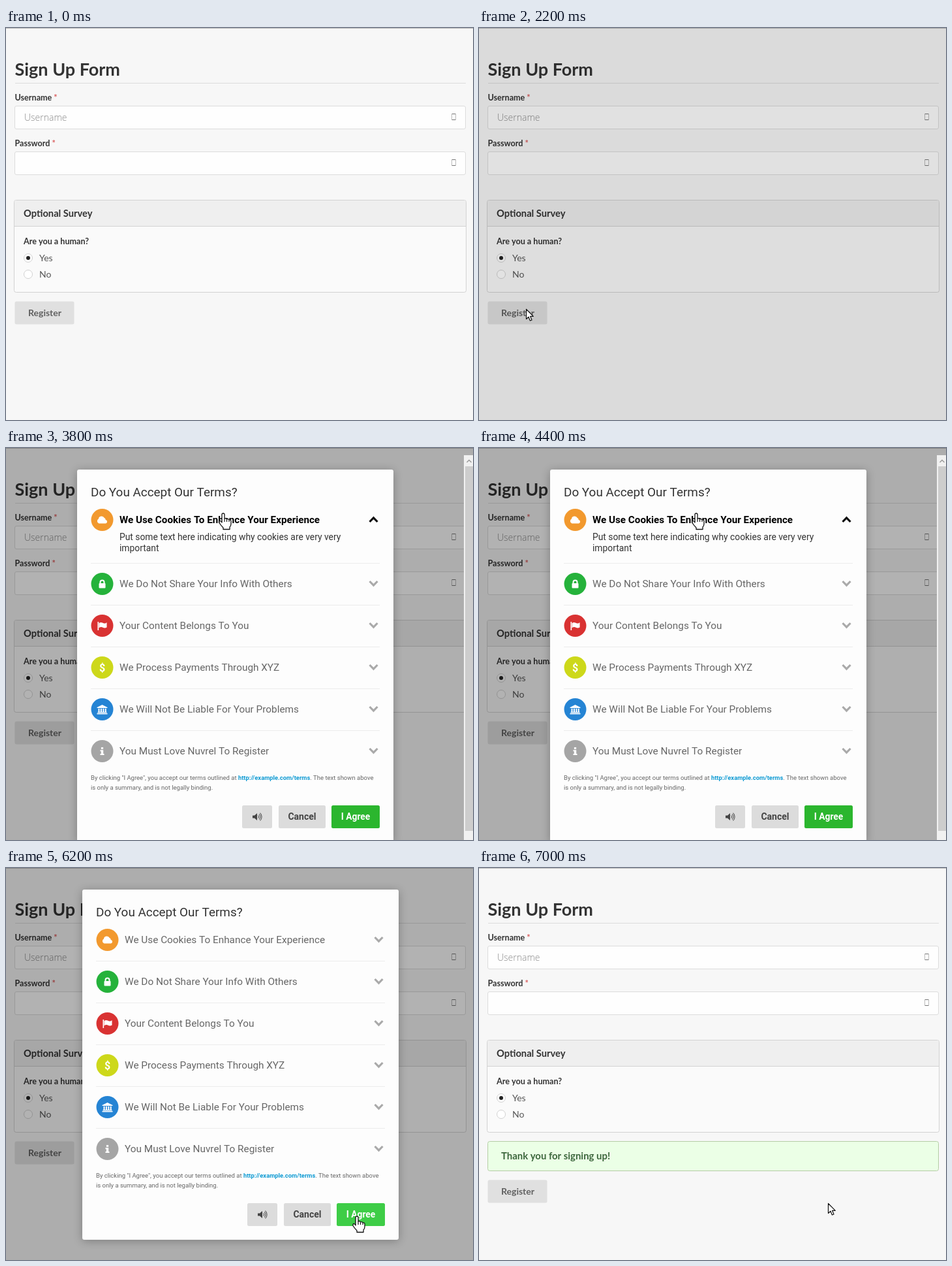
These frames come from a looping animation (716x600 px, 7.4 s). An HTML page with a canvas:

```html
<!DOCTYPE html>
<html lang="en">
<head>
<meta charset="utf-8">
<title>Sign Up Form</title>
<style>
html, body { margin: 0; width: 100%; height: 100%; overflow: hidden; background: #f7f7f7; }
canvas { display: block; }
</style>
</head>
<body>
<canvas id="stage" width="716" height="600"></canvas>
<script>
const ctx = document.getElementById('stage').getContext('2d');
const LOOP = 7400, STEP = 200;
const LATO = 'Lato, sans-serif', ROBOTO = 'Roboto, sans-serif';

const ROWS = [
  ['We Use Cookies To Enhance Your Experience', '#f2992e', cloud],
  ['We Do Not Share Your Info With Others', '#25b23b', lock],
  ['Your Content Belongs To You', '#d93232', flag],
  ['We Process Payments Through XYZ', '#cdd81a', dollar],
  ['We Will Not Be Liable For Your Problems', '#2584d4', bank],
  ['You Must Love Nuvrel To Register', '#a5a5a5', info]
];

// Pointer path: time, x, y
const PATH = [
  [200, 677, 52], [400, 560, 230], [600, 380, 400], [800, 200, 487], [1000, 96, 452],
  [1200, 72, 430], [2300, 72, 430], [2600, 215, 350], [2800, 250, 290], [3000, 268, 233],
  [3200, 305, 158], [3400, 333, 100], [4600, 333, 100], [4800, 410, 112], [5000, 473, 180],
  [5200, 505, 270], [5400, 525, 390], [5600, 536, 495], [5800, 538, 533], [6400, 538, 533],
  [6800, 535, 513], [7400, 535, 513]
];

const ramp = (t, a, b) => Math.min(1, Math.max(0, (t - a) / (b - a)));
const smooth = p => p * p * (3 - 2 * p);

function pointer(t) {
  let i = 1;
  while (i < PATH.length - 1 && PATH[i][0] < t) i++;
  const [t0, x0, y0] = PATH[i - 1], [t1, x1, y1] = PATH[i];
  const p = ramp(t, t0, t1);
  return { x: x0 + (x1 - x0) * p, y: y0 + (y1 - y0) * p };
}

function text(str, x, y, font, color, align = 'left') {
  ctx.font = font;
  ctx.fillStyle = color;
  ctx.textAlign = align;
  ctx.fillText(str, x, y);
  return ctx.measureText(str).width;
}

function box(x, y, w, h, r, fill, stroke) {
  ctx.beginPath();
  ctx.roundRect(x, y, w, h, r);
  if (fill) { ctx.fillStyle = fill; ctx.fill(); }
  if (stroke) { ctx.strokeStyle = stroke; ctx.lineWidth = 1; ctx.stroke(); }
}

function rect(x, y, w, h, fill) {
  ctx.fillStyle = fill;
  ctx.fillRect(x, y, w, h);
}

function disc(x, y, r, fill, stroke) {
  ctx.beginPath();
  ctx.arc(x, y, r, 0, 2 * Math.PI);
  ctx.fillStyle = fill;
  ctx.fill();
  if (stroke) { ctx.strokeStyle = stroke; ctx.lineWidth = 1; ctx.stroke(); }
}

function shape(d, fill, stroke, width = 1) {
  const p = new Path2D(d);
  if (fill) { ctx.fillStyle = fill; ctx.fill(p); }
  if (stroke) { ctx.strokeStyle = stroke; ctx.lineWidth = width; ctx.stroke(p); }
}

// Row icons, centred on 0,0
function cloud() { shape('M-5 5.5A3.8 3.8 0 0 1-5.6-1.5A4.6 4.6 0 0 1 3-3.2A3.3 3.3 0 0 1 5.2 0A2.8 2.8 0 0 1 5.4 5.5Z', '#fff'); }
function lock() {
  box(-5, -1, 10, 7.5, 1, '#fff');
  shape('M-3 0V-2.5A3 3 0 0 1 3-2.5V0', null, '#fff', 2);
}
function flag() {
  rect(-7, -6, 1.6, 13, '#fff');
  shape('M-5-4Q-2-6 1-4.2T7-5V2.6Q4 4.5 1 2.8T-5 3.5Z', '#fff');
}
function dollar() { text('$', 0, 6, 'bold 16px ' + ROBOTO, '#fff', 'center'); }
function bank() {
  shape('M0-7L8-3V-2H-8V-3Z', '#fff');
  for (let i = 0; i < 4; i++) rect(-6 + i * 3.4, -1.2, 2, 5.4, '#fff');
  rect(-7, 4, 14, 1.4, '#fff');
  rect(-8, 6, 16, 1.5, '#fff');
}
function info() {
  rect(-1.6, -6, 3.2, 3, '#fff');
  shape('M-3-1.7H1.7V4H3V6H-3V4H-1.7V.3H-3Z', '#fff');
}

function field(label, y) {
  const w = text(label, 13.5, y - 8.5, 'bold 12.6px ' + LATO, '#333');
  text('*', 13.5 + w + 3, y - 8.5, 'bold 12.6px ' + LATO, '#d95c5c');
  box(13.5, y, 691, 35, 2.5, '#fefefe', '#dcdcdc');
  rect(683, y + 11.5, 7, 10, '#bbb');
  rect(684, y + 12.5, 5, 8, '#fefefe');
  rect(684, y + 11.5, 5, 1, '#777');
  rect(684, y + 20.5, 5, 1, '#777');
}

function radio(label, y, on) {
  disc(34, y, 6.5, '#fff', '#d2d2d2');
  if (on) disc(34, y, 3, '#222');
  text(label, 51, y + 5, '14px ' + LATO, '#555');
}

function drawForm(done) {
  rect(0, 0, 716, 600, '#f7f7f7');
  rect(0, 0, 716, 1, '#bcbcbc');
  text('Sign Up Form', 13.5, 73, 'bold 27px ' + LATO, '#333');
  rect(14, 84, 691, 1, '#dcdcdc');
  field('Username', 119.5);
  text('Username', 28, 142, '300 14px "Open Sans", sans-serif', '#888');
  field('Password', 189.5);

  box(12.5, 263.5, 693, 141, 3, '#fafafa', '#d2d2d2');
  box(13, 264, 692, 39, [3, 3, 0, 0], '#efefef');
  rect(13, 303, 692, 1, '#d2d2d2');
  text('Optional Survey', 27, 289, 'bold 14.7px ' + LATO, '#333');
  text('Are you a human?', 27, 331, 'bold 12.6px ' + LATO, '#333');
  radio('Yes', 352, true);
  radio('No', 377, false);

  if (done) {
    box(13.5, 418.5, 691, 45, 3, '#ebffe6', '#b4cda5');
    text('Thank you for signing up!', 34, 446, 'bold 14.9px ' + LATO, '#3c663c');
  }
  const y = done ? 477.5 : 418.5;
  box(13.5, y, 91, 35, 2.5, '#e0e0e0');
  text('Register', 34, y + 22.5, 'bold 14px ' + LATO, '#606060');
}

function chevron(x, y, up, color) {
  const d = up ? -3.5 : 3.5;
  ctx.lineJoin = 'miter';
  shape(`M${x - 6} ${y - d}L${x} ${y + d * .75}L${x + 6} ${y - d}`, null, color, 3.2);
}

function drawRow(i, y, hover, active) {
  const [title, color, icon] = ROWS[i];
  disc(38.5, y, 17, color);
  ctx.save();
  ctx.translate(38.5, y);
  icon();
  ctx.restore();
  const dark = hover || active;
  const font = active ? 'bold 15.2px ' : '15.35px ';
  text(title, 65, y + 5, font + ROBOTO, active ? '#000' : hover ? '#222' : '#666');
  chevron(454.5, y - .5, active, dark ? '#111' : '#aaa');
}

function drawModal(m) {
  const grow = 34 * m.expand;
  ctx.save();
  ctx.translate(m.x + 242.5, m.y + 268);
  ctx.scale(m.scale, m.scale);
  ctx.translate(-242.5, -268);
  ctx.globalAlpha = m.alpha;

  ctx.shadowColor = 'rgba(0,0,0,.28)';
  ctx.shadowBlur = 14;
  ctx.shadowOffsetY = 2;
  box(0, 0, 485, 536 + grow, 3, '#fdfdfd');
  ctx.shadowColor = 'transparent';

  text('Do You Accept Our Terms?', 21, 41, '18.9px ' + ROBOTO, '#333');
  ROWS.forEach((_, i) => {
    const y = 77 + 64 * i + (i ? grow : 0);
    drawRow(i, y, m.hover === i, i === 0 && m.active);
    if (i < 5) rect(21, y + 32 + (i ? 0 : grow), 443, 1, '#ececec');
  });

  if (grow) {
    ctx.save();
    ctx.beginPath();
    ctx.rect(60, 92, 400, 16 + grow);
    ctx.clip();
    ctx.globalAlpha = m.alpha * m.expand;
    const font = '13.85px ' + ROBOTO;
    text('Put some text here indicating why cookies are very very', 65, 108, font, '#333');
    text('important', 65, 125, font, '#333');
    ctx.restore();
  }

  ctx.translate(0, grow);
  const small = '9.5px ' + ROBOTO;
  let x = 21;
  x += text('By clicking "I Agree", you accept our terms outlined at ', x, 441, small, '#666');
  x += text('http://example.com/terms', x, 441, 'bold 9.4px ' + ROBOTO, '#0d9ad3');
  text('. The text shown above', x, 441, small, '#666');
  text('is only a summary, and is not legally binding.', 21, 455.5, small, '#666');

  box(253, 480, 46, 35, 2.5, '#dcdcdc');
  shape('M269 495.5H272L276 492V503L272 499.5H269Z', '#444');
  shape('M277.6 495.3A3 3 0 0 1 277.6 499.7M279 493.3A5.5 5.5 0 0 1 279 501.7M280.5 491.6A8 8 0 0 1 280.5 503.4', null, '#555', 1.1);
  box(309, 480, 72, 35, 2.5, '#dcdcdc');
  text('Cancel', 345, 502, 'bold 14px ' + ROBOTO, '#444', 'center');
  box(390, 480, 74, 35, 2.5, m.overAgree ? '#3ecd47' : '#2bb62e');
  if (m.focus) box(390, 480, 74, 35, 2.5, null, '#5a9fe0');
  text('I Agree', 427, 502, 'bold 13.8px ' + ROBOTO, '#fff', 'center');
  ctx.restore();
}

function drawScrollbar() {
  rect(702, 11, 14, 589, '#f1f1f1');
  rect(704, 28, 12, 558, '#cdcdcd');
  shape('M706.5 22L710 18.5L713.5 22', null, '#999', 1.4);
}

function drawPointer({ x, y }, hand) {
  ctx.save();
  ctx.translate(x, y);
  ctx.lineJoin = 'round';
  if (hand) {
    shape('M-2 2Q-2 0 0 0T2 2V8Q4 7 5.5 9Q8 8 9 10Q12 9.5 12 12V16Q12 19 10 21V24.5H0V22Q-4 18-6 14.5Q-6.5 11.5-4.5 11.5Q-3 12-2 14Z', '#fff', '#111', 1.3);
    shape('M2 8V13M5.5 9.5V13M9 10.5V13', null, '#111', 1.2);
  } else {
    shape('M.5 .5V15.5L4 12.2L6.4 18L9 17L6.6 11.3H11.3Z', '#fff', '#111', 1.2);
  }
  ctx.restore();
}

function draw(t) {
  const shown = t >= 2250 && t < 6800;
  const fade = 1 - ramp(t, 6400, 6900);
  drawForm(t >= 6500);
  rect(0, 0, 716, 600, `rgba(0,0,0,${.3 * ramp(t, 2080, 2400) * fade})`);

  if (shown) {
    const expand = smooth(ramp(t, 3400, 3700)) - smooth(ramp(t, 4400, 4700));
    const scrolled = expand > .9;
    const x = scrolled ? 109 : 117;
    const y = t >= 4600 && t < 5300 ? 28 : 33;
    const presence = smooth(ramp(t, 2250, 2600)) * (1 - smooth(ramp(t, 6300, 6800)));

    // Hover colours trail the pointer by one step.
    const trail = pointer(t - STEP);
    const inside = t >= 2600 && trail.x > x + 21 && trail.x < x + 464;
    drawModal({
      x, y, expand,
      alpha: presence,
      scale: .7 + .3 * presence,
      hover: inside ? Math.floor((trail.y - y - 45) / 64) : -1,
      active: t >= 3500 && t <= 4400,
      focus: t < 3400,
      overAgree: t >= 5800
    });
    if (scrolled) drawScrollbar();
  }

  if (t >= 200) drawPointer(pointer(t), t >= 2600 && t < 6600);
}

function frame(now) {
  draw(Math.floor((now % LOOP) / STEP) * STEP);
  requestAnimationFrame(frame);
}
requestAnimationFrame(frame);
</script>
</body>
</html>
```
